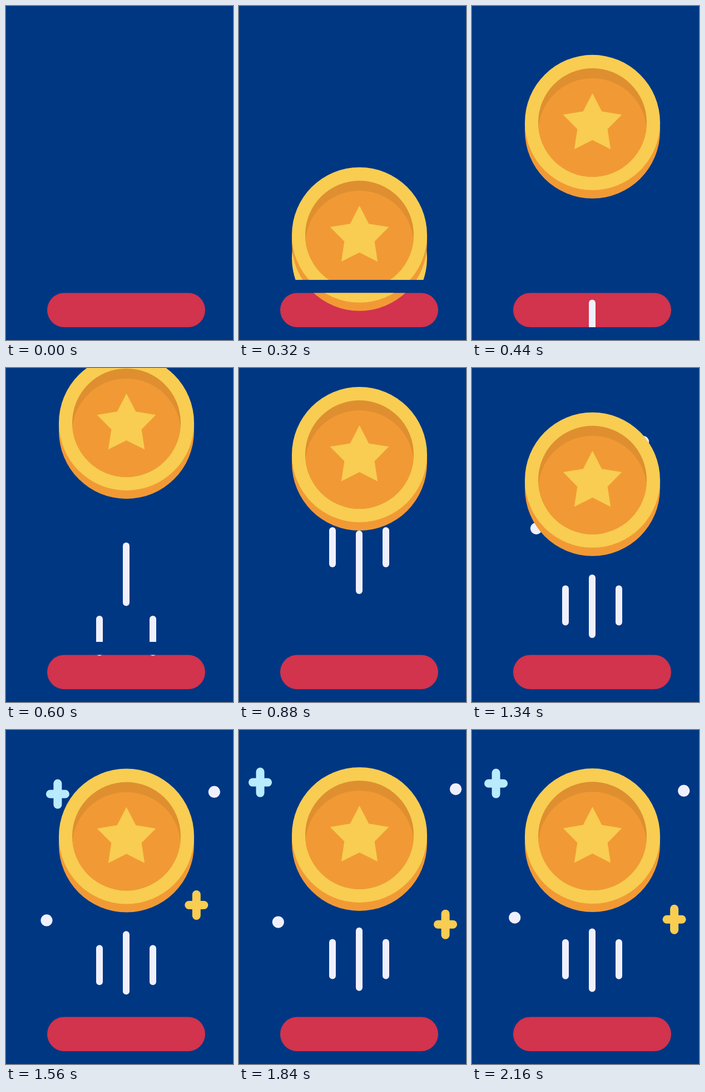
Recreate the animation shown at these times as an HTML page with a canvas. Size 408 by 600 pixels, loop 2.18 s.

```html
<!DOCTYPE html>
<html lang="en">
<head>
<meta charset="utf-8">
<title>Coin jump</title>
<style>
  html, body { margin: 0; width: 100%; height: 100%; overflow: hidden; background: #003783; }
  canvas { display: block; width: 408px; height: 600px; }
</style>
</head>
<body>
<canvas id="stage" width="408" height="600"></canvas>
<script>
const ctx = document.getElementById('stage').getContext('2d');
const LOOP = 2180, STEP = 20;
const BLUE = '#003783', RED = '#d2334d', GOLD = '#f8cd51', ORANGE = '#f19a35',
      SHADE = '#df8f2f', WHITE = '#f0f0fc', ICE = '#b9ebff';
const CX = 216.5, HORIZON = 492;

// Remaining offset (1 to 0) of an underdamped spring released at rest.
function spring(t, decay, freq) {
  if (t <= 0) return 1;
  const a = freq * t;
  return Math.exp(-decay * t) * (Math.cos(a) + decay / freq * Math.sin(a));
}

const rise = (t, start, distance) => distance * spring(t - start, 0.0033, 0.0056);
const coinTop = t => 69 + rise(t, 80, 610);

const streaks = [
  { x: 216, top: 357, length: 114, start: 178, distance: 587 },
  { x: 168, top: 377, length: 72, start: 276, distance: 600 },
  { x: 264, top: 377, length: 72, start: 276, distance: 600 }
];

const ORIGIN = { x: 216, y: 162 };
const sparkles = [
  { x: 76.5, y: 337.5, start: 1104, color: WHITE },
  { x: 380.3, y: 109.3, start: 1176, color: WHITE },
  { x: 362, y: 338.3, start: 1248, color: GOLD, plus: true },
  { x: 47, y: 97.5, start: 1320, color: ICE, plus: true }
];

function disc(x, y, r, color) {
  ctx.fillStyle = color;
  ctx.beginPath();
  ctx.arc(x, y, r, 0, Math.PI * 2);
  ctx.fill();
}

function bar(x, y, w, h, color) {
  ctx.fillStyle = color;
  ctx.beginPath();
  ctx.roundRect(x, y, w, h, Math.min(w, h) / 2);
  ctx.fill();
}

function star(x, y, outer, inner) {
  ctx.fillStyle = GOLD;
  ctx.beginPath();
  for (let i = 0; i < 10; i++) {
    const r = i % 2 ? inner : outer, a = i * Math.PI / 5;
    ctx.lineTo(x + r * Math.sin(a), y - r * Math.cos(a));
  }
  ctx.fill();
}

function coin(top) {
  const cy = top + 121.5;
  ctx.fillStyle = ORANGE;
  ctx.fillRect(CX - 121.5, cy, 243, 15);
  disc(CX, cy + 15, 121.5, ORANGE);
  disc(CX, cy, 121.5, GOLD);
  disc(CX, cy, 97.5, SHADE);
  ctx.save();
  ctx.clip();
  disc(CX, cy + 18, 97.5, ORANGE);
  ctx.restore();
  star(CX, top + 124.5, 55.5, 28.5);
}

// Gold smear left behind while the coin breaks through the horizon.
function smear(t) {
  const top = coinTop(t);
  if (top > HORIZON || top + 257 < HORIZON) return;
  ctx.save();
  ctx.beginPath();
  ctx.rect(0, 0, 408, HORIZON);
  ctx.clip();
  disc(CX, coinTop(t - STEP) + 121.5, 121.5, GOLD);
  ctx.restore();
}

function sparkle(s, t) {
  const p = 1 - 0.7 * spring(t - s.start, 0.00409, 0.00529);
  const x = ORIGIN.x + (s.x - ORIGIN.x) * p;
  const y = ORIGIN.y + (s.y - ORIGIN.y) * p;
  if (s.plus) {
    bar(x - 7.5, y - 26.5, 15, 53, s.color);
    bar(x - 21, y - 7.5, 42, 15, s.color);
  } else {
    disc(x, y, 10.6, s.color);
  }
}

function draw(t) {
  ctx.fillStyle = BLUE;
  ctx.fillRect(0, 0, 408, 600);
  bar(74, 515.5, 284, 61.5, RED);

  ctx.save();
  ctx.beginPath();
  ctx.rect(0, 0, 408, HORIZON);
  ctx.roundRect(74, 515.5, 284, 61.5, 30.75);
  ctx.clip();
  for (const s of streaks) {
    bar(s.x - 6, s.top + rise(t, s.start, s.distance), 12, s.length, WHITE);
  }
  for (const s of sparkles) if (t > s.start) sparkle(s, t);
  smear(t);
  coin(coinTop(t));
  ctx.restore();
}

function frame() {
  const t = performance.now() % LOOP;
  draw(Math.floor(t / STEP) * STEP);
  requestAnimationFrame(frame);
}
frame();
</script>
</body>
</html>
```
